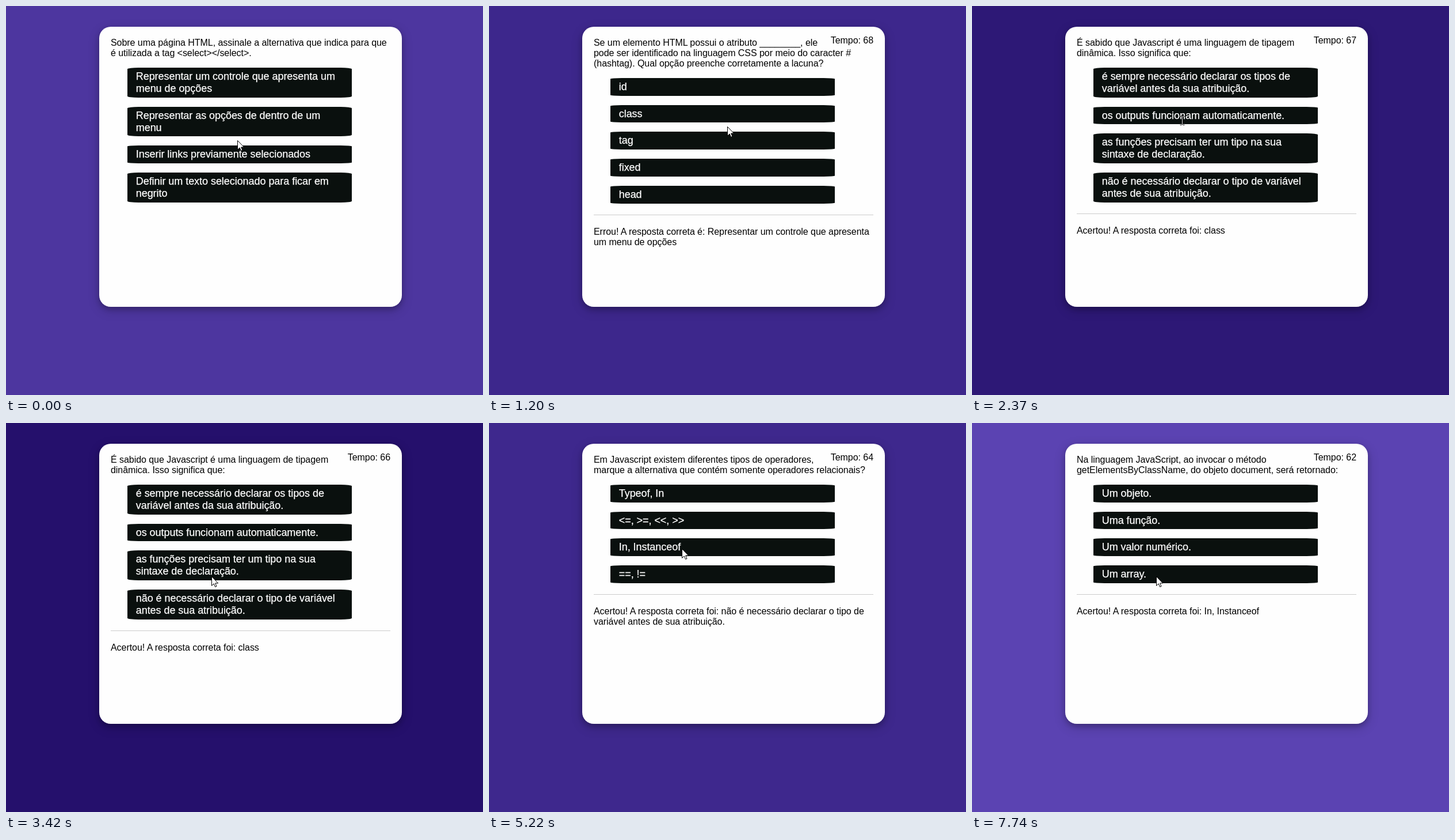
These frames come from a looping animation (829 px wide and 675 px high, 8 s). An HTML page:

```html
<!DOCTYPE html>
<html lang="pt">
<head>
<meta charset="utf-8">
<title>Quiz</title>
<style>
  html, body { margin: 0; width: 100%; height: 100%; overflow: hidden; }
  body { position: relative; font: 16px/18px "Liberation Sans", Arial, sans-serif; letter-spacing: -.05px; color: #000; }
  #card {
    position: absolute; left: 162px; top: 36px; width: 526px; height: 486px;
    box-sizing: border-box; padding: 19px 20px 0; border-radius: 20px; background: #fefefe;
    box-shadow: 0 4px 8px rgba(0, 0, 0, .2), 0 6px 20px rgba(0, 0, 0, .19);
  }
  p { margin: 0; white-space: pre; }
  #time { position: absolute; right: 20px; top: 15px; }
  ul { margin: 16px 0 0 6%; padding: 0; list-style: none; width: 389.6px; }
  li {
    margin-bottom: 16px; padding: 1% 3%; border-radius: 5%; background: #0a100e; color: #fff;
    font-size: 18px; line-height: 21px; white-space: pre; -webkit-text-stroke: .25px #fff;
  }
  /* Percentages refer to the card's 486px content width. */
  li { padding: 4.86px 14.58px; }
  li:last-child { margin-bottom: 0; }
  hr { margin: 19.6px 0 19.4px; border: 0; height: 1px; background: #ccc; }
  svg { position: absolute; left: 0; top: 0; overflow: visible; }
  #beam { mix-blend-mode: difference; }
</style>
</head>
<body>
<div id="card">
  <p id="time"></p>
  <p id="question"></p>
  <ul id="options"></ul>
  <hr id="rule">
  <p id="feedback"></p>
</div>
<svg id="arrow" width="13" height="20"><path d="M.5 .5V16.3L4.2 12.9 6.6 18.4 9 17.4 6.7 12H11.6Z" fill="#fff" stroke="#000"/></svg>
<svg id="beam" width="1" height="1"><path d="M-3.5 -7.5H-1L.5 -6.5 2 -7.5H4.5M.5 -6.5V6.5M-3.5 7.5H-1L.5 6.5 2 7.5H4.5" fill="none" stroke="#ddd"/></svg>
<script>
const LOOP = 8000;
const $ = id => document.getElementById(id);

const quiz = [
  { at: 0,
    question: 'Sobre uma página HTML, assinale a alternativa que indica para que\né utilizada a tag <select></select>.',
    options: ['Representar um controle que apresenta um\nmenu de opções', 'Representar as opções de dentro de um\nmenu',
      'Inserir links previamente selecionados', 'Definir um texto selecionado para ficar em\nnegrito'],
    feedback: '' },
  { at: 600,
    question: 'Se um elemento HTML possui o atributo ________, ele\npode ser identificado na linguagem CSS por meio do caracter #\n(hashtag). Qual opção preenche corretamente a lacuna?',
    options: ['id', 'class', 'tag', 'fixed', 'head'],
    feedback: 'Errou! A resposta correta é: Representar um controle que apresenta\num menu de opções' },
  { at: 2370, overText: true,
    question: 'É sabido que Javascript é uma linguagem de tipagem\ndinâmica. Isso significa que:',
    options: ['é sempre necessário declarar os tipos de\nvariável antes da sua atribuição.', 'os outputs funcionam automaticamente.',
      'as funções precisam ter um tipo na sua\nsintaxe de declaração.', 'não é necessário declarar o tipo de variável\nantes de sua atribuição.'],
    feedback: 'Acertou! A resposta correta foi: class' },
  { at: 4740,
    question: 'Em Javascript existem diferentes tipos de operadores,\nmarque a alternativa que contém somente operadores relacionais?',
    options: ['Typeof, In', '<=, >=, <<, >>', 'In, Instanceof', '==, !='],
    feedback: 'Acertou! A resposta correta foi: não é necessário declarar o tipo de\nvariável antes de sua atribuição.' },
  { at: 6090, overText: true,
    question: 'Na linguagem JavaScript, ao invocar o método\ngetElementsByClassName, do objeto document, será retornado:',
    options: ['Um objeto.', 'Uma função.', 'Um valor numérico.', 'Um array.'],
    feedback: 'Acertou! A resposta correta foi: In, Instanceof' }
];

// The pointer rests between these moves.
const home = { x: 402, y: 233 };
const moves = [
  { at: 120, ms: 360, x: 414, y: 209 },
  { at: 1210, ms: 260, x: 392, y: 255 },
  { at: 1500, ms: 450, x: 365, y: 199 },
  { at: 3120, ms: 540, x: 352, y: 314 },
  { at: 4740, ms: 480, x: 335, y: 218 },
  { at: 6460, ms: 450, x: 320, y: 266 }
];

const lerp = (a, b, k) => a + (b - a) * k;
const ease = k => k * k * (3 - 2 * k);
const started = (list, t) => list.filter(item => item.at <= t);

function pointer(t) {
  return started(moves, t).reduce((p, m) => {
    const k = ease(Math.min(1, (t - m.at) / m.ms));
    return { x: lerp(p.x, m.x, k), y: lerp(p.y, m.y, k) };
  }, home);
}

// The backdrop darkens towards 3170 ms and brightens again.
function backdrop(t) {
  const k = Math.sin(Math.abs(t - 3170) * .000205);
  const dark = [33, 13, 103], light = [105, 80, 196];
  return `rgb(${dark.map((v, i) => Math.round(lerp(v, light[i], k)))})`;
}

let shown;
function showQuestion(item) {
  if (item === shown) return;
  shown = item;
  $('question').textContent = item.question;
  $('options').replaceChildren(...item.options.map(text => {
    const li = document.createElement('li');
    li.textContent = text;
    return li;
  }));
  $('feedback').textContent = item.feedback;
  $('rule').style.visibility = item.feedback ? 'visible' : 'hidden';
}

function draw() {
  const t = performance.now() % LOOP;
  const current = started(quiz, t).pop();
  showQuestion(current);

  const ticks = Math.floor((t + 730) / 960);
  $('time').textContent = ticks ? `Tempo: ${70 - ticks}` : '';

  const { x, y } = pointer(t);
  const lastMove = started(moves, t).pop();
  const beam = current.overText && lastMove.at < current.at;
  for (const id of ['arrow', 'beam']) {
    $(id).style.transform = `translate(${Math.round(x)}px, ${Math.round(y)}px)`;
    $(id).style.visibility = (id === 'beam') === !!beam ? 'visible' : 'hidden';
  }
  document.body.style.background = backdrop(t);
  requestAnimationFrame(draw);
}
draw();
</script>
</body>
</html>
```
